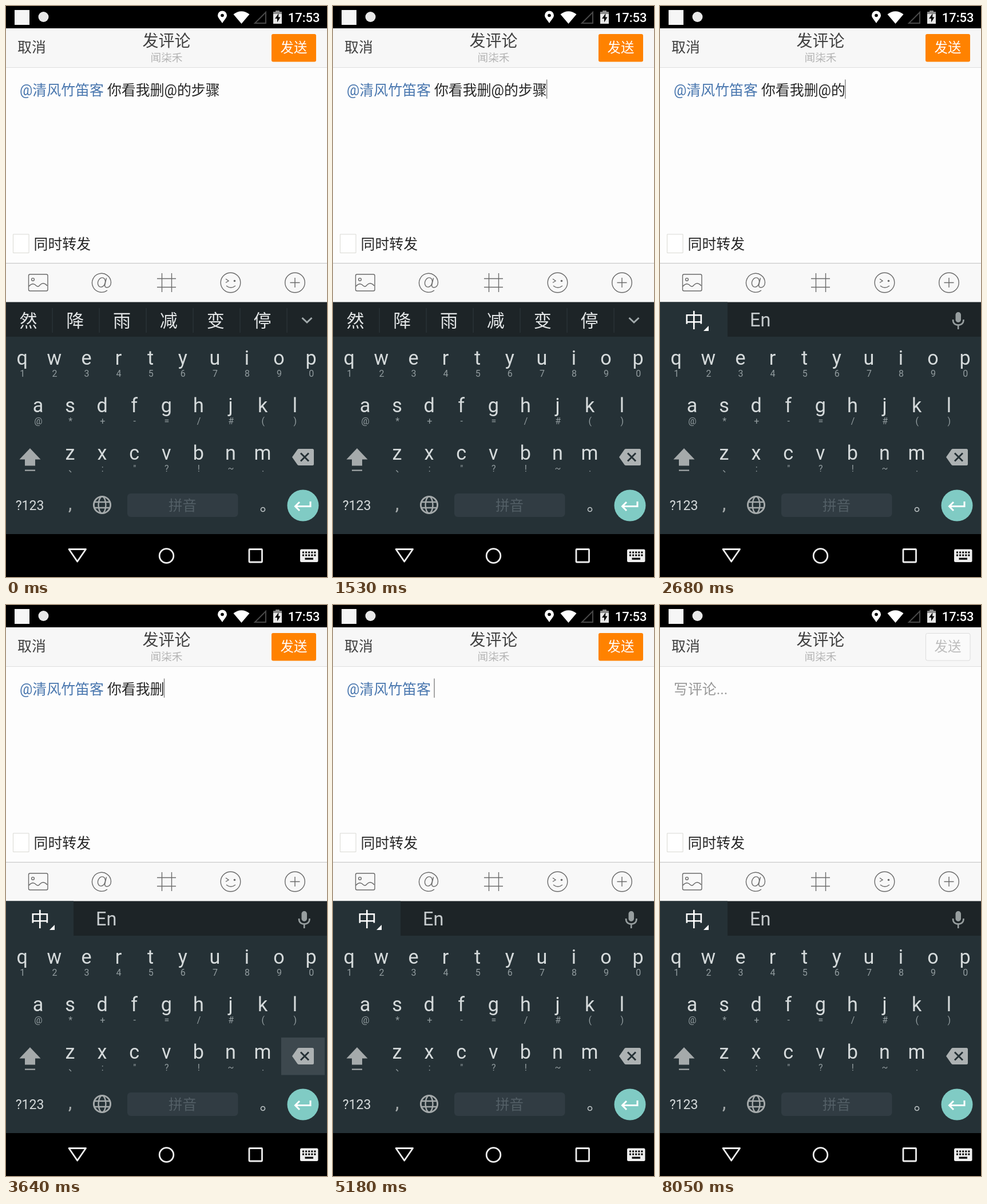
Animation of 561 by 998 pixels, one loop 8.43 s. Source, as an HTML page with a canvas:

```html
<!DOCTYPE html>
<html lang="zh-CN">
<head>
<meta charset="utf-8">
<title>发评论</title>
<style>
html, body { margin: 0; width: 100%; height: 100%; overflow: hidden; background: #000; }
canvas { display: block; width: 561px; height: 998px; }
</style>
</head>
<body>
<canvas id="stage"></canvas>
<script>
const W = 561, H = 998, LOOP = 8430;
const FONT = 'Roboto, "Noto Sans CJK SC", "Noto Sans CJK", sans-serif';
const MENTION = '@清风竹笛客';
const TAIL = [...' 你看我删@的步骤'];
const INK = '#262626', KEYS = '#253136', GREY = '#a5aaab', LETTER = '#d5dadb';

// Each press of the delete key takes effect one step later.
const PRESSES = [1920, 2300, 2870, 3260, 3640, 4020, 4600, 4980, 5370, 5750, 6520];
const LAG = 190;
const BLINKS = [380, 770, 1150, 5940, 6710, 7090, 7670, 8050];

const canvas = document.getElementById('stage');
const ctx = canvas.getContext('2d');
const ratio = window.devicePixelRatio || 1;
canvas.width = Math.round(W * ratio);
canvas.height = Math.round(H * ratio);

function rect(x, y, w, h, color) {
  ctx.fillStyle = color;
  ctx.fillRect(x, y, w, h);
}

function paint(fill, stroke, width) {
  if (fill) { ctx.fillStyle = fill; ctx.fill(); }
  if (stroke) { ctx.strokeStyle = stroke; ctx.lineWidth = width; ctx.stroke(); }
}

function box(x, y, w, h, r, fill, stroke, width = 1) {
  ctx.beginPath();
  ctx.roundRect(x, y, w, h, r);
  paint(fill, stroke, width);
}

function circle(x, y, r, fill, stroke, width = 1) {
  ctx.beginPath();
  ctx.arc(x, y, r, 0, Math.PI * 2);
  paint(fill, stroke, width);
}

function shape(d, fill, stroke, width = 1) {
  const path = new Path2D(d);
  if (fill) { ctx.fillStyle = fill; ctx.fill(path); }
  if (stroke) { ctx.strokeStyle = stroke; ctx.lineWidth = width; ctx.stroke(path); }
}

function text(str, x, y, size, color, align = 'left', weight = 400) {
  ctx.font = `${weight} ${size}px ${FONT}`;
  ctx.textAlign = align;
  ctx.fillStyle = color;
  ctx.fillText(str, x, y);
  return ctx.measureText(str).width;
}

function stateAt(t) {
  const done = PRESSES.filter(p => t >= p + LAG).length;
  return {
    pressed: PRESSES.some(p => t >= p && t < p + LAG),
    tail: TAIL.slice(0, Math.max(0, TAIL.length - done)).join(''),
    suggesting: done === 0,
    marked: done === PRESSES.length - 1,
    empty: done === PRESSES.length,
    cursor: BLINKS.filter(b => t >= b).length % 2 === 1
  };
}

function statusBar() {
  rect(0, 0, W, 39, '#000');
  rect(15, 7, 26, 26, '#f6f6f6');
  circle(65.5, 19, 9, '#e8e8e8');
  shape('M378 30C374 24 370 20 370 16.5A8 8 0 0 1 386 16.5C386 20 382 24 378 30Z', '#fff');
  circle(378, 16.5, 2.8, '#000');
  shape('M397.5 14.5Q411.5 4 425.5 14.5L411.5 31Z', '#fff');
  shape('M454 11V30H435Z', null, '#484848', 2);
  shape('M467 10.5H471.5V8H477.5V10.5H482V31H467Z', '#e6e6e6');
  shape('M467 10.5H471.5V8H477.5V10.5H482V14H467Z', '#8c8c8c');
  shape('M476.5 13L470 22H474V28.5L479.5 19.5H476Z', '#000');
  text('17:53', 548.5, 28, 22, '#fff', 'right', 500);
}

function header(empty) {
  rect(0, 39, W, 69, '#f7f7f7');
  rect(0, 107, W, 1.5, '#dedede');
  text('取消', 20, 81, 24.9, '#404040');
  text('发评论', 280.5, 71, 28, '#404040', 'center');
  text('闻柒禾', 280.5, 96.5, 18.7, '#b4b4b4', 'center');
  if (empty) {
    box(464.5, 49.5, 77.5, 47.5, 3, '#fafafa', '#dcdcdc');
  } else {
    box(464, 49, 78, 48.5, 3, '#ff8200');
  }
  text('发送', 503, 81, 23.4, empty ? '#bcbcbc' : '#fff', 'center');
}

function editor(s) {
  rect(0, 108, W, 341, '#fdfdfd');
  let x = 24;
  if (s.empty) {
    text('写评论...', x, 156, 24.9, '#999');
  } else {
    if (s.marked) rect(23.5, 128, 147.5, 34, '#b3dd86');
    x += text(MENTION, x, 156, 24.9, '#4876ae');
    x += text(s.tail, x, 156, 24.9, INK);
  }
  if (s.cursor) rect(x - 0.7, 128.5, 1.5, 33.5, '#8a8a8a');

  box(12.5, 399, 27.5, 32.5, 0, '#fff', '#d9d9d4');
  text('同时转发', 48.5, 425, 24.9, INK);
}

function toolbar() {
  const c = '#6a6a6a', w = 1.4;
  rect(0, 449, W, 69, '#f8f8f8');
  rect(0, 449, W, 1.2, '#c9c9c9');

  box(39.5, 469, 33.5, 29, 2.5, null, c, w);
  circle(47, 478, 2.4, null, c, w);
  shape('M40 490Q47 482 53 489Q56 492 59 488Q65 481 72 489', null, c, w);

  shape('M177 497A16.5 16.5 0 1 1 183.5 483C183.5 489 180 492 176.5 492C173 492 172 489.5 173 486L175.5 475.5', null, c, w);
  ctx.beginPath();
  ctx.ellipse(167, 483, 6.3, 8.3, 0.35, 0, Math.PI * 2);
  paint(null, c, w);

  shape('M272.5 467V500M289.5 467V500M264 476.5H297M264 491.5H297', null, c, w);

  circle(392.5, 483.5, 17.3, null, c, w);
  shape('M384 477L389 480.5L384 483.5M385 489Q393 495.5 401 489', null, c, w);
  circle(399.5, 480.5, 1.8, c);

  circle(505, 483.5, 17.3, null, c, w);
  shape('M496.5 483.5H513.5M505 475V492', null, c, w);
}

function suggestions(open) {
  rect(0, 517.5, W, 61, '#1d2427');
  if (open) {
    [...'然降雨减变停'].forEach((ch, i) => {
      text(ch, 39 + i * 81.8, 561, 31.1, '#e2e5e6', 'center');
      rect(80.5 + i * 82, 528, 1.2, 43, '#2d363b');
    });
    shape('M517.5 545L526 553L534.5 545', null, '#a2aaac', 3);
    return;
  }
  rect(0, 517.5, 118, 61, KEYS);
  text('中', 59.5, 561.5, 34.3, '#fff', 'center', 500);
  shape('M85 559V568H76Z', '#fff');
  text('En', 157, 560, 32.5, '#c6cbcd');
  box(516.5, 535, 9.5, 18, 4.7, '#979e9f');
  shape('M512 548Q512 557.5 521.2 557.5Q530.5 557.5 530.5 548M521.2 557V565', null, '#979e9f', 2.6);
}

function keyRow(letters, hints, left, y) {
  [...letters].forEach((ch, i) => {
    const x = left + i * 56.1;
    text(ch, x, y, 34.2, LETTER, 'center');
    text(hints[i], x + (hints[i] === '、' ? 5 : 0.5), y + 21, 16, '#929c9f', 'center');
  });
}

function keyboard(pressed) {
  rect(0, 578, W, 345, KEYS);
  keyRow('qwertyuiop', '1234567890', 28.3, 626.5);
  keyRow('asdfghjkl', '@*+-=/#()', 56, 709.5);
  keyRow('zxcvbnm', '、:"?!~.', 112, 792.7);

  shape('M42 773L60.5 792.5H51V803.5H33V792.5H23.5Z', GREY);
  rect(33, 810.5, 18, 2.2, GREY);

  if (pressed) rect(481, 756, 76, 65.5, '#3d484e');
  shape('M500 788.5L509.5 775Q510.5 774 512 774H535.5Q538 774 538 776.5V800.5Q538 803 535.5 803H512Q510.5 803 509.5 802Z', '#adb2b3');
  shape('M515 781.5L529 795.5M529 781.5L515 795.5', null, KEYS, 3);

  text('?123', 41.5, 881, 23, LETTER, 'center');
  text(',', 112, 881, 34, GREY, 'center');
  globe(168, 872, 14.6);
  box(212, 852, 193.5, 41, 6, '#313c43');
  text('拼音', 308.5, 882, 24.5, '#535f66', 'center');
  circle(449, 880, 3.5, null, '#c0c6c8', 1.6);

  circle(519, 873, 27.5, '#80cbc4');
  shape('M532 866V874.5H506M513 867L505.5 874.5L513 882', null, '#fff', 3);
}

function globe(x, y, r) {
  circle(x, y, r, null, GREY, 2.9);
  ctx.beginPath();
  ctx.ellipse(x, y, r * 0.44, r, 0, 0, Math.PI * 2);
  paint(null, GREY, 2.4);
  shape(`M${x - 13} ${y - 5}h26M${x - 13} ${y + 5}h26`, null, GREY, 2.6);
}

function navBar() {
  rect(0, 923, W, 75, '#000');
  ctx.lineJoin = 'round';
  shape('M110 949.5H139.5L124.7 971Z', null, '#eee', 2.8);
  ctx.lineJoin = 'miter';
  circle(280.5, 961, 12.3, null, '#eee', 2.8);
  box(425, 949.5, 22.5, 22.5, 1, null, '#eee', 2.8);

  box(514, 949.5, 31.5, 22.5, 2.5, '#eee');
  for (let row = 0; row < 2; row++) {
    for (let i = 0; i < 5; i++) rect(518 + i * 5.1, 953.5 + row * 5, 3, 3, '#000');
  }
  rect(522.5, 964.5, 14.5, 3.2, '#000');
}

function draw(t) {
  const s = stateAt(t);
  ctx.setTransform(ratio, 0, 0, ratio, 0, 0);
  statusBar();
  header(s.empty);
  editor(s);
  toolbar();
  suggestions(s.suggesting);
  keyboard(s.pressed);
  navBar();
}

const start = performance.now();
function tick() {
  draw((performance.now() - start) % LOOP);
  requestAnimationFrame(tick);
}
tick();
</script>
</body>
</html>
```
